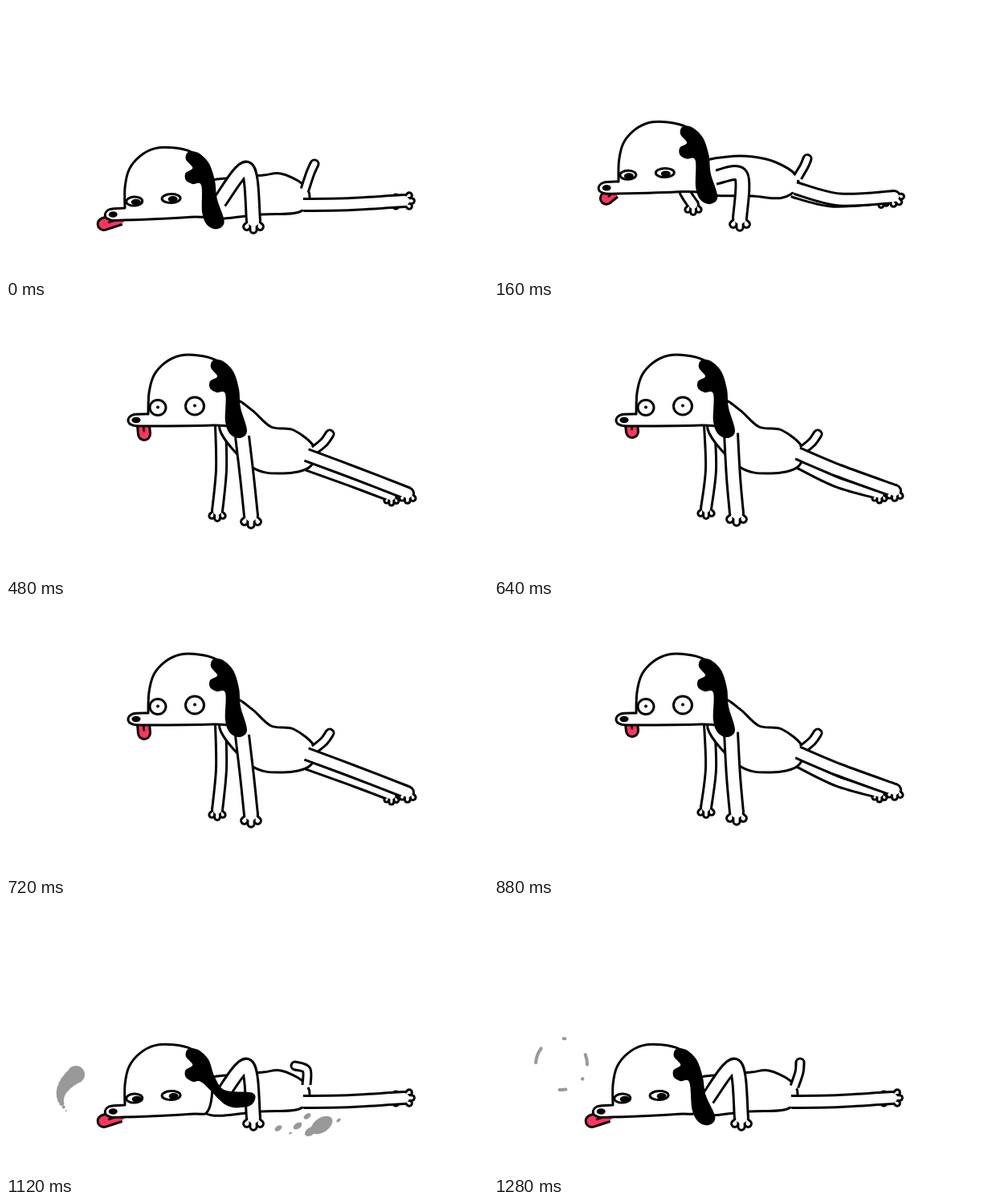
Recreate the animation shown at these times as an HTML page with a canvas. Size 600 px wide and 338 px high, loop 1360 ms.

```html
<!DOCTYPE html>
<html lang="en">
<head>
<meta charset="utf-8">
<title>Push-up dog</title>
<style>
  html, body { margin: 0; width: 100%; height: 100%; overflow: hidden; background: #fff; }
  canvas { display: block; }
</style>
</head>
<body>
<canvas id="stage" width="600" height="338"></canvas>
<script>
const ctx = document.getElementById('stage').getContext('2d');
const STEP = 80, STEPS = 17, LINE = 3;
const INK = '#000', PAPER = '#fff', PINK = '#ff3560', DUST = '#999';

// Rigid shapes, drawn in the raised head's place.
const BROW = [177, 136];
const HEAD = [...BROW, 178, 110, 184, 88, 198, 72, 217, 63, 240, 63, 262, 69, 279, 83, 287, 110,
  280, 147, 258, 150, 175, 151, 158, 150, 152, 144, 158, 137, ...BROW];
const EAR = [258, 69, 270, 70, 283, 83, 290, 105, 292, 128, 300, 157, 291, 166, 279, 161,
  273, 145, 273, 111, 262, 109, 254, 104, 254, 95, 263, 89, 255, 78];
const EAR_ROOT = [280, 95];

// Limbs are joints: hip or shoulder, knee or elbow, ankle or wrist.
const down = {
  head: [-29, 116, -0.035], eyes: [0, 2, 1], tongue: [150, 155], earBend: [0], footAngle: [0],
  body: [250, 222, 285, 214, 320, 211, 342, 209, 368, 221, 378, 238, 365, 257, 318, 260, 250, 263],
  tail: [372, 229, 379, 208, 384, 197],
  arm: [266, 244, 300, 203, 308, 268], farArm: [240, 225, 236, 232, 238, 240],
  leg: [370, 248, 430, 247, 496, 243], farLeg: [370, 248, 430, 247, 480, 244]
};
const mid = {
  head: [-15, 50, 0], eyes: [0, 0, 1.5], tongue: [173, 158], earBend: [0], footAngle: [1.6],
  body: [268, 172, 297, 162, 325, 165, 360, 181, 383, 200, 376, 217, 350, 222, 325, 214, 272, 202],
  tail: [384, 198, 393, 192, 396, 184],
  arm: [287, 183, 315, 220, 304, 262], farArm: [252, 203, 236, 222, 258, 256],
  leg: [380, 206, 430, 236, 500, 233], farLeg: [372, 216, 410, 241, 485, 237]
};
const up = {
  head: [0, 0, 0], eyes: [1, 0, -0.5], tongue: [172, 161], earBend: [0], footAngle: [1.6],
  body: [284, 120, 306, 131, 330, 152, 358, 156, 384, 178, 378, 202, 345, 210, 306, 202, 266, 155],
  tail: [384, 181, 396, 171, 403, 161],
  arm: [294, 164, 300, 215, 305, 263], farArm: [267, 150, 268, 205, 263, 257],
  leg: [374, 187, 433, 209, 500, 235], farLeg: [374, 200, 427, 219, 480, 239]
};
const hold = {
  ...up, tongue: [172, 158],
  arm: [295, 160, 298, 215, 302, 260], farArm: [268, 150, 270, 205, 264, 254],
  leg: [378, 185, 430, 207, 499, 232], farLeg: [378, 197, 427, 221, 480, 236]
};
const settle = { ...down, eyes: [0, 3, 1], earBend: [-0.06], tail: [374, 229, 380, 211, 381, 199] };
const land = { ...settle, earBend: [-0.75], tail: [374, 227, 374, 208, 360, 203] };

const timeline = [[0, down], [4, mid], [6, up], [8, hold], [9, up], [11, hold],
  [12, mid], [13, down], [14, land], [16, settle], [17, down]];

const mix = (a, b, k) => a + (b - a) * k;

function poseAt(step) {
  const next = timeline.findIndex(([t]) => t > step);
  const [[t0, from], [t1, to]] = timeline.slice(next - 1, next + 1);
  const k = (step - t0) / (t1 - t0), pose = {};
  for (const part in from) pose[part] = from[part].map((v, i) => mix(v, to[part][i], k));
  return pose;
}

// Smooth path through flat [x, y, x, y, ...] points.
function trace(p, closed) {
  const n = p.length / 2;
  const at = i => {
    const j = closed ? (i + n) % n : Math.max(0, Math.min(n - 1, i));
    return [p[2 * j], p[2 * j + 1]];
  };
  ctx.beginPath();
  ctx.moveTo(p[0], p[1]);
  for (let i = 0; i < (closed ? n : n - 1); i++) {
    const [a, b, c, d] = [at(i - 1), at(i), at(i + 1), at(i + 2)];
    ctx.bezierCurveTo(b[0] + (c[0] - a[0]) / 6, b[1] + (c[1] - a[1]) / 6,
      c[0] - (d[0] - b[0]) / 6, c[1] - (d[1] - b[1]) / 6, c[0], c[1]);
  }
}

function outline(fill) {
  ctx.fillStyle = fill;
  ctx.strokeStyle = INK;
  ctx.lineWidth = LINE;
  ctx.fill();
  ctx.stroke();
}

function oval(x, y, rx, ry = rx, turn = 0) {
  ctx.beginPath();
  ctx.ellipse(x, y, rx, ry, turn, 0, 2 * Math.PI);
}

function stroke(color, width, cap) {
  ctx.strokeStyle = color;
  ctx.lineWidth = width;
  ctx.lineCap = cap;
  ctx.stroke();
}

// Outlined tube with a round tip and an open joint at its first point.
function tube(p, width, fill = PAPER, drawTip = () => {}) {
  const [x, y] = p.slice(-2);
  trace(p);
  stroke(INK, width + LINE, 'butt');
  oval(x, y, (width + LINE) / 2);
  ctx.fillStyle = INK;
  ctx.fill();
  drawTip(x, y);
  trace(p);
  stroke(fill, width - LINE, 'round');
}

function limb(joints, width, angle, toe) {
  tube(joints, width, PAPER, (x, y) => {
    for (const spread of [-0.85, 0.85, 0]) {
      const a = angle + spread;
      tube([x, y, x + toe * Math.cos(a), y + toe * Math.sin(a)], toe * 0.75);
    }
  });
}

function eye(x, y, r, [wide, lookX, lookY]) {
  ctx.save();
  oval(x, y, r, mix(5.5, r - 0.5, wide));
  outline(PAPER);
  ctx.clip();
  oval(x + lookX, y + lookY, mix(6, 2, wide), mix(3.8, 2, wide));
  ctx.fillStyle = INK;
  ctx.fill();
  ctx.restore();
}

// The lower the point on the ear, the further it swings around the root.
function bentEar(bend) {
  const [rx, ry] = EAR_ROOT, out = [];
  for (let i = 0; i < EAR.length; i += 2) {
    const x = EAR[i] - rx, y = EAR[i + 1] - ry;
    const a = bend * Math.max(0, Math.min(1, (y - 10) / 50));
    out.push(rx + x * Math.cos(a) - y * Math.sin(a), ry + x * Math.sin(a) + y * Math.cos(a));
  }
  return out;
}

function head({ head: [dx, dy, tilt], eyes, tongue, earBend }) {
  const [bx, by] = BROW;
  ctx.save();
  ctx.translate(bx + dx, by + dy);
  ctx.rotate(tilt);
  ctx.translate(-bx, -by);
  const root = [171, 149];
  tube([...root, ...tongue], 15, PINK);
  trace([...root, mix(root[0], tongue[0], 0.7), mix(root[1], tongue[1], 0.7)]);
  stroke(INK, LINE - 0.5, 'round');
  trace(HEAD);
  outline(PAPER);
  trace(bentEar(earBend[0]), true);
  ctx.fillStyle = INK;
  ctx.fill();
  eye(189, 128, 10, eyes);
  eye(235, 126, 11.5, eyes);
  oval(162, 143.5, 5.5, 3.8);
  ctx.fillStyle = INK;
  ctx.fill();
  ctx.restore();
}

const specks = [[339, 281, 5], [354, 287, 2], [363, 278, 6], [375, 266, 5],
  [379, 285, 8], [393, 277, 15], [414, 271, 3]];
const ringArcs = [[3.2, 0.6], [4.8, 0.05], [5.9, 0.4], [0.6, 0.02], [1.4, 0.25]];

function dust(step) {
  const age = step - 14;
  if (age < 0) return;
  ctx.fillStyle = DUST;
  if (age === 0) {
    for (let u = 0; u <= 1; u += 0.1) {
      oval(87 - 62 * u + 50 * u * u, 214 + 45 * u, 1 + 10 * (1 - u));
      ctx.fill();
    }
  } else {
    for (const [from, length] of ringArcs) {
      ctx.beginPath();
      ctx.arc(84, 201, 32, from, from + length);
      stroke(DUST, 10 - 3 * age, 'round');
    }
  }
  for (const [x, y, size] of specks) {
    const r = size * (1 - age / 2);
    oval(x, y, r, r * 0.6, -0.6);
    ctx.fill();
  }
}

function draw(step) {
  const pose = poseAt(step), foot = pose.footAngle[0], hand = Math.PI / 2;
  ctx.fillStyle = PAPER;
  ctx.fillRect(0, 0, 600, 338);
  ctx.lineJoin = 'round';
  dust(step);
  limb(pose.farArm, 13, hand, 9);
  limb(pose.farLeg, 12, foot, 8);
  trace(pose.body, true);
  outline(PAPER);
  tube(pose.tail, 10);
  limb(pose.leg, 15, foot, 9);
  limb(pose.arm, 17, hand, 11);
  head(pose);
}

const start = performance.now();
function tick() {
  draw(Math.floor((performance.now() - start) / STEP) % STEPS);
  requestAnimationFrame(tick);
}
tick();
</script>
</body>
</html>
```
